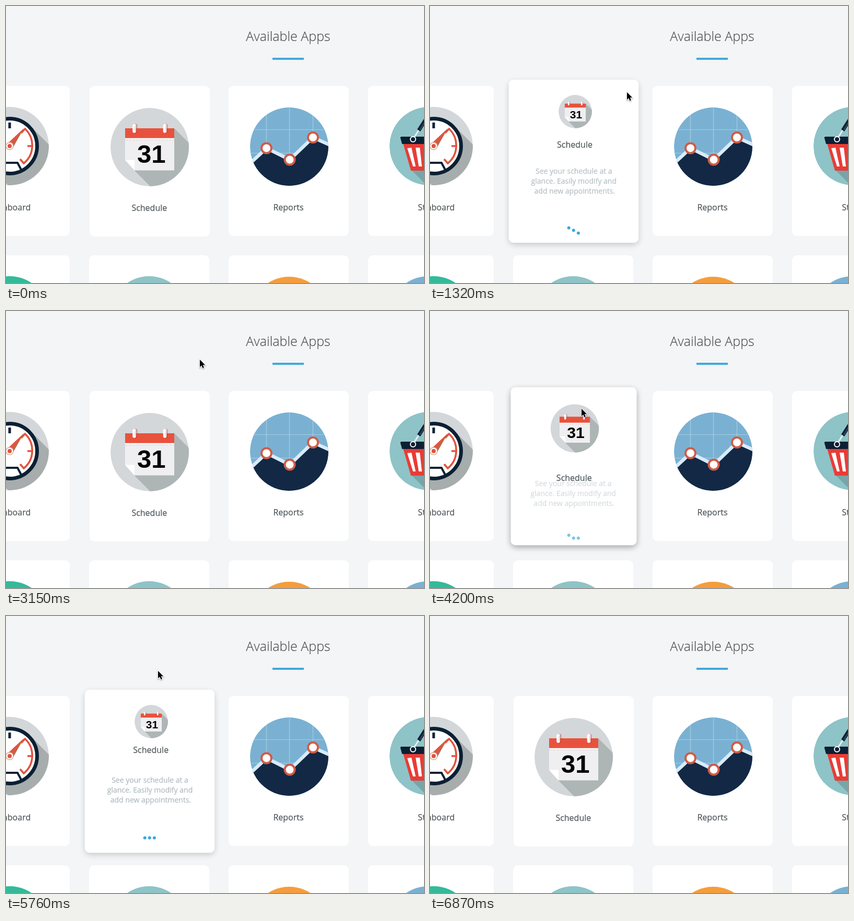
These frames come from a looping animation (800x530 px, 6930 ms). An HTML page:

```html
<!DOCTYPE html>
<html lang="en">
<head>
<meta charset="utf-8">
<title>Available Apps</title>
<style>
  html, body { margin: 0; width: 100%; height: 100%; overflow: hidden; background: #f3f5f7; }
  svg { display: block; width: 800px; height: 530px; }
  text { font-family: "Open Sans", sans-serif; text-anchor: middle; }
  .label { font-size: 16px; fill: #515a5d; stroke: #515a5d; stroke-width: .25; }
  .note { font-size: 14px; fill: #aeb8be; stroke: #aeb8be; stroke-width: .2; }
  .head { font-size: 25px; font-weight: 300; fill: #484d50; stroke: #484d50; stroke-width: .15; }
  .day { font: bold 49px "Liberation Sans", Arial, sans-serif; text-anchor: start; }
</style>
</head>
<body>
<svg viewBox="0 0 800 530">
  <defs>
    <clipPath id="disc"><circle r="75"/></clipPath>
    <filter id="blur" x="-20%" y="-20%" width="140%" height="140%"><feGaussianBlur stdDeviation="6"/></filter>
    <filter id="soft" x="-50%" y="-50%" width="200%" height="200%"><feGaussianBlur stdDeviation="1"/></filter>
    <path id="arrow" d="M0 0V14.2L3.3 11.2L5.5 16.2L7.9 15.2L5.8 10.3H10.2Z"/>
  </defs>

  <text class="head" x="540" y="66.5">Available Apps</text>
  <rect x="510" y="99" width="60" height="4" fill="#41a8dc"/>
  <g id="cards" fill="#fff"></g>

  <!-- dashboard -->
  <g transform="translate(7 268)" clip-path="url(#disc)">
    <circle r="75" fill="#d3d7d9"/>
    <path d="M39 -39L99 21V99H21L-39 39Z" fill="#a7adad"/>
    <circle r="52.5" fill="#fff" stroke="#0b1f33" stroke-width="7"/>
    <path d="M0 -45V-34" stroke="#0b1f33" stroke-width="5"/>
    <g fill="none" stroke="#e2533d" stroke-width="3.6">
      <path d="M22 -25L29.5 -33A44 44 0 0 1 27 33L20 25M34 0H44"/>
    </g>
    <path d="M-4 -5L27 -34L5 5Z" fill="#e2533d"/>
    <path d="M2 0L27 -34L5 5Z" fill="#b9694f"/>
    <path d="M-28 45L-19 32H15L22 45" fill="#fff" stroke="#0b1f33" stroke-width="4"/>
    <circle r="7" fill="#fff" stroke="#d8a698" stroke-width="1.4"/>
    <circle r="4" fill="#e2533d"/>
  </g>
  <text class="label" x="6" y="391">Dashboard</text>

  <!-- reports -->
  <g transform="translate(542 269)" clip-path="url(#disc)">
    <circle r="75" fill="#7ab1d3"/>
    <path d="M-43.5 -75V75M.5 -75V75M45.5 -75V75M-75 -32.5H75M-75 12.5H75" stroke="#a4cde0" stroke-width="1.2"/>
    <path d="M-80 37L-43.5 3L1 25L45.5 -17.5L80 -2V80H-80Z" fill="#122845"/>
    <path d="M-80 37L-43.5 3L1 25L45.5 -17.5L80 -2" fill="none" stroke="#d8ebfb" stroke-width="6.5"/>
    <g fill="#fff" stroke="#cf5d47" stroke-width="4">
      <circle cx="-43.5" cy="3" r="9.5"/><circle cx="1" cy="25" r="9.5"/><circle cx="45.5" cy="-17.5" r="9.5"/>
    </g>
  </g>
  <text class="label" x="540.5" y="391">Reports</text>

  <!-- store -->
  <g transform="translate(809 268)" clip-path="url(#disc)">
    <circle r="75" fill="#8ec3c7"/>
    <path d="M-33 46L9 88H80V-4L50 -14Z" fill="#78a5a8"/>
    <path d="M-49 -5H49L34 47H-34Z" fill="#e93c36"/>
    <path d="M-41 4L-33 3L-25 39H-30ZM-25 3H-17L-13 39H-19ZM-9 3H-1L-2 39H-7Z" fill="#fff"/>
    <path d="M-52 -18H52Q55 -18 54 -15L51 -4H-51L-54 -15Q-55 -18 -52 -18Z" fill="#0c1f33"/>
    <path d="M-30 -13L-17 -34" stroke="#e6eef0" stroke-width="3"/>
    <path d="M-19 -30L-5 -52" stroke="#0c1f33" stroke-width="7"/>
    <path d="M-17 -31L-4 -52" stroke="#41576a" stroke-width="1.5"/>
    <circle cx="-30" cy="-13" r="5" fill="#0c1f33" stroke="#fff" stroke-width="2"/>
  </g>
  <text class="label" x="808" y="391">Store</text>

  <!-- second row -->
  <circle cx="7" cy="592" r="75" fill="#33ba99"/>
  <circle cx="274" cy="592" r="75" fill="#8ec3c7"/>
  <circle cx="542" cy="593" r="75" fill="#f59d3c"/>
  <circle cx="808" cy="592" r="75" fill="#7ab1d3"/>

  <!-- schedule -->
  <rect id="shadow" rx="10" filter="url(#blur)"/>
  <rect id="card" rx="9" fill="#fff"/>
  <g id="note" class="note">
    <text y="5">See your schedule at a</text>
    <text y="24">glance. Easily modify and</text>
    <text x="1.5" y="43">add new appointments.</text>
  </g>
  <g id="dots" fill="#3ba8da"><circle r="3"/><circle r="3"/><circle r="3"/></g>
  <g id="icon"><g clip-path="url(#disc)">
    <circle r="75" fill="#d3d7d9"/>
    <path d="M47 -36L127 44V124H50L-29 45Z" fill="#aeb5b5"/>
    <path d="M-47 -20H47V44.5H-29L-47 25Z" fill="#efeff1"/>
    <path d="M-47 24.5H-29V44.5Z" fill="#fff"/>
    <path d="M-47 -36H47V-17H-47Z" fill="#e8523d"/>
    <path d="M-47 -16.3H47" stroke="#fff" stroke-width="2"/>
    <path d="M-47 -13.5H47" stroke="#d6d6d8" stroke-width="1" stroke-dasharray="5 2"/>
    <path d="M-27 -41V-30M31 -41V-30" stroke="#b8423a" stroke-opacity=".45" stroke-width="7" stroke-linecap="round"/>
    <path d="M-29.5 -41V-30.5M29 -41V-30.5" stroke="#fff" stroke-width="6.5" stroke-linecap="round"/>
    <path d="M-28 -41V-30.5M30.5 -41V-30.5" stroke="#d5d8da" stroke-width="1.5"/>
    <text class="day" x="-24" y="30">31</text>
  </g></g>
  <text id="title" class="label">Schedule</text>

  <g id="cursor">
    <use href="#arrow" y="1.5" stroke="#000" stroke-width="2" opacity=".3" filter="url(#soft)"/>
    <use href="#arrow" stroke="#fff" stroke-width="2" stroke-linejoin="round"/>
    <use href="#arrow"/>
  </g>
</svg>
<script>
const LOOP = 6930;
const HOVERS = [[990, 2550], [4080, 5765]];
const PATH = [
  [120, 806, 300], [960, 392, 175], [1320, 377, 165], [1800, 372, 185],
  [2300, 376, 190], [2640, 373, 108], [2880, 371, 93], [3300, 371, 93],
  [3800, 290, 92], [4200, 290, 187], [4600, 291, 215], [5300, 290, 210],
  [5760, 291, 105], [6050, 292, 88], [6500, 292, 88], [6840, 292, -22]
];
const $ = id => document.getElementById(id);
const set = (el, attrs) => { for (const k in attrs) el.setAttribute(k, attrs[k]); };
const move = (el, x, y, s = 1) => el.setAttribute("transform", `translate(${x} ${y}) scale(${s})`);
const clamp = v => Math.min(1, Math.max(0, v));
const mix = (a, b, p) => a + (b - a) * p;
const smooth = p => p * p * (3 - 2 * p);
const cubicOut = p => 1 - (1 - p) ** 3;

// cubic-bezier(.25, .1, .25, 1)
function ease(x) {
  let lo = 0, hi = 1, s = .5;
  for (let i = 0; i < 18; i++) {
    s = (lo + hi) / 2;
    if (.75 * s * (1 - s) + s ** 3 < x) lo = s; else hi = s;
  }
  return x <= 0 ? 0 : x >= 1 ? 1 : .3 * (1 - s) ** 2 * s + 3 * (1 - s) * s * s + s ** 3;
}

// progress towards the hovered state: 0 at rest, 1 when open
function hover(t, inTime, outTime, curve = ease, delay = 0) {
  const span = HOVERS.findLast(h => t >= h[0]);
  if (!span) return 0;
  const [start, end] = span;
  return t < end
    ? curve(clamp((t - start - delay) / inTime))
    : 1 - ease(clamp((t - end) / outTime));
}

function cursorAt(t) {
  const i = PATH.findIndex(k => k[0] > t);
  if (i < 1) return [-50, -50];
  const [a, b] = [PATH[i - 1], PATH[i]];
  const p = smooth((t - a[0]) / (b[0] - a[0]));
  return [mix(a[1], b[1], p), mix(a[2], b[2], p)];
}

function draw(t) {
  const grow = hover(t, 350, 295);
  const shrink = hover(t, 310, 280);
  const slide = hover(t, 565, 282, cubicOut);

  const w = mix(230, 248.6, grow), h = mix(288, 312, grow);
  const box = { x: 275 - w / 2, y: 297 - h / 2, width: w, height: h };
  set($("card"), box);
  const shade = grow < .55 ? grow / .55 * .34 : mix(.34, .17, (grow - .55) / .45);
  set($("shadow"), { ...box, y: box.y + 4, opacity: shade });

  move($("icon"), mix(275, 278, shrink), mix(270, 202, shrink), mix(1, .427, shrink));
  move($("title"), mix(274.3, 277.2, slide), mix(392, 262, slide));
  move($("note"), mix(272.7, 275.5, slide), mix(348, 314, slide));
  set($("note"), { opacity: slide });

  set($("dots"), { opacity: shrink });
  [...$("dots").children].forEach((dot, i) => {
    const rise = hover(t, 380, 282, ease, i * 215);
    move(dot, 265.7 + 9.1 * i, mix(434.5, 424.5, rise));
  });

  move($("cursor"), ...cursorAt(t));
}

$("cards").innerHTML = [-108, 159, 426, 693].map((x, i) =>
  (i === 1 ? "" : `<rect x="${x}" y="153" width="230" height="287" rx="9"/>`) +
  `<rect x="${x}" y="477" width="230" height="287" rx="9"/>`).join("");

function tick() {
  draw(performance.now() % LOOP);
  requestAnimationFrame(tick);
}
tick();
</script>
</body>
</html>
```
